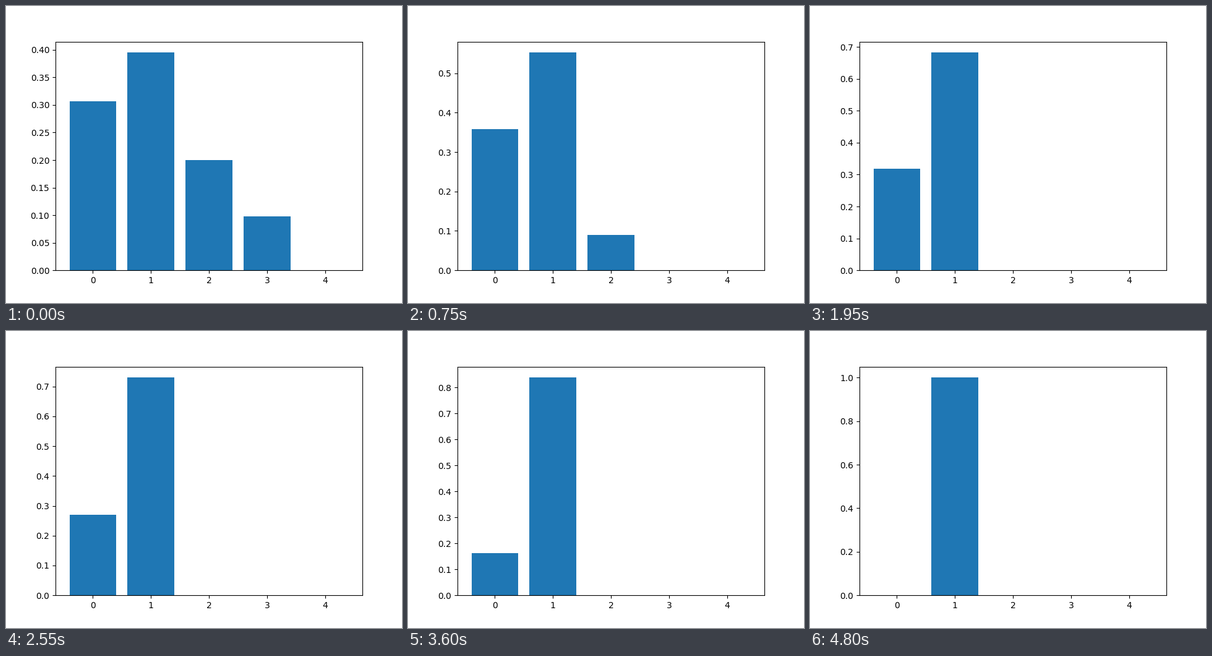
A matplotlib script that plays this animation: 640 px wide and 480 px high, repeating every 8 s.

```python
import numpy as np
import matplotlib.pyplot as plt
from matplotlib.animation import FuncAnimation

INTERVAL = 50        # ms per drawn frame
TICKS_PER_STEP = 3   # the bars advance every 150 ms
LAST_STEP = 32
FRAMES = 160


def project(scores):
    """Euclidean projection of scores onto the probability simplex."""
    ordered = np.sort(scores)[::-1]
    ranks = np.arange(1, len(scores) + 1)
    shifts = (np.cumsum(ordered) - 1) / ranks
    support = np.count_nonzero(ordered > shifts)
    return np.maximum(scores - shifts[support - 1], 0)


def gap_to_first(step):
    """Lead of bar 1 over bar 0: steady at first, then accelerating."""
    if step <= 9:
        return np.interp(step, [0, 5, 9], [0.0885, 0.195, 0.286])
    t = step - 17
    return 0.4605 + 0.0265 * t + 0.00064 * t * t


def heights(step):
    gaps = [gap_to_first(step), 0, 0.195 + 0.0534 * step,
            0.297 + 0.085 * step, 2]
    return project(-np.array(gaps))


fig, ax = plt.subplots(figsize=(6.4, 4.8), dpi=100)
bars = ax.bar(range(5), heights(0), color="#1f77b4")


def update(frame):
    values = heights(min(frame // TICKS_PER_STEP, LAST_STEP))
    for bar, value in zip(bars, values):
        bar.set_height(value)
    ax.set_ylim(0, 1.05 * values.max())
    return bars


anim = FuncAnimation(fig, update, frames=FRAMES, interval=INTERVAL,
                     repeat=True, repeat_delay=0, blit=False)
plt.show()
```
